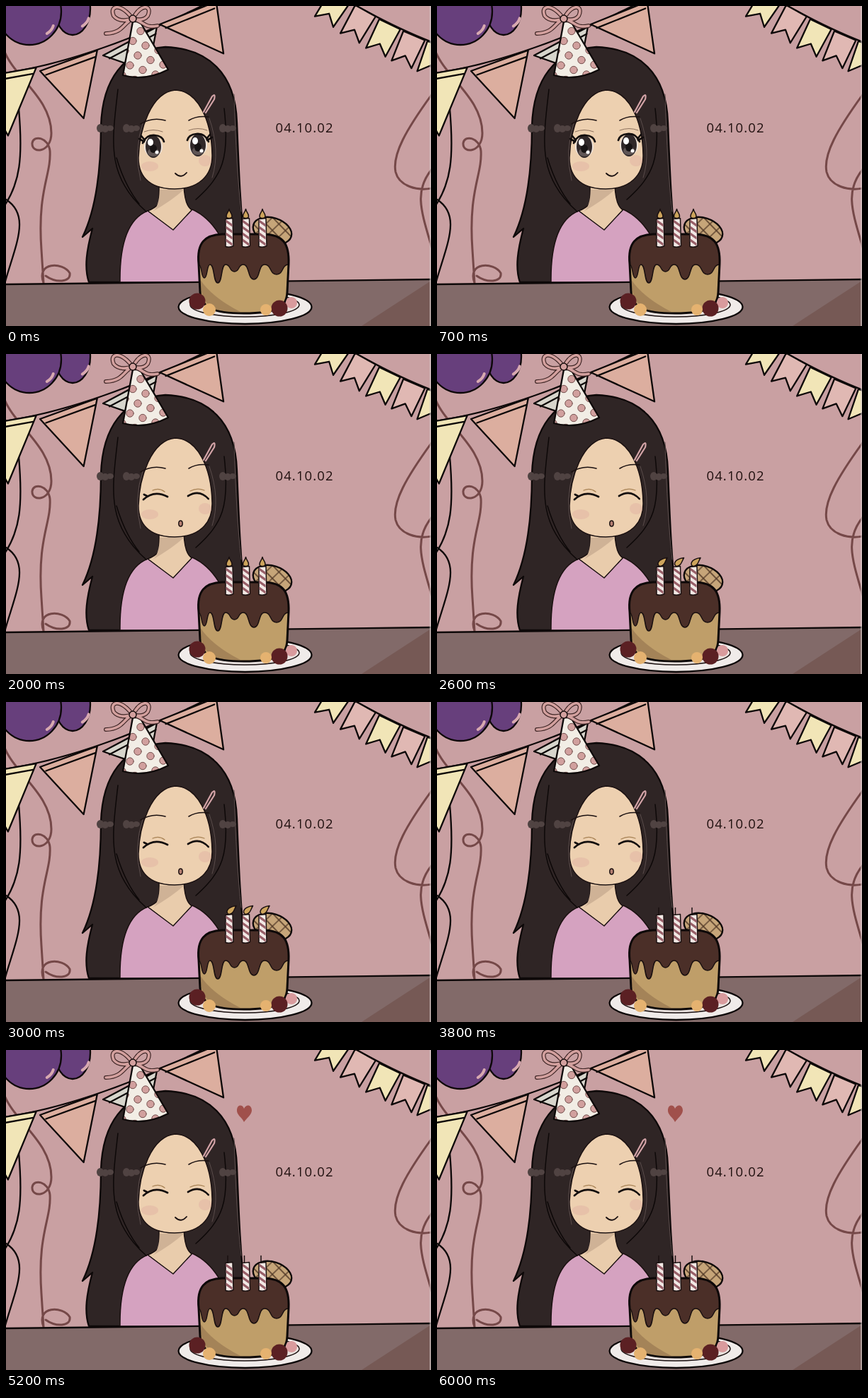
An HTML page for the animation above (6.1 s loop, 600 px wide and 453 px high).

```html
<!DOCTYPE html>
<html lang="en">
<head>
<meta charset="utf-8">
<title>Birthday cake</title>
<style>
  html, body { margin: 0; width: 100%; height: 100%; overflow: hidden; background: #c9a0a2; }
  svg { display: block; width: 100vw; height: 100vh; stroke-linecap: round; stroke-linejoin: round; }
  .ink { stroke: #0d0808; stroke-width: 2.3; }
  .thin { stroke: #1a1010; stroke-width: 1.5; }
  .open { fill: none; }
  .ribbon { fill: none; stroke: #754848; stroke-width: 3; }
  .blush { fill: #dca79d; opacity: .35; }
  text { font: 400 18.5px "Open Sans", Lato, sans-serif; letter-spacing: 1.1px; fill: #20100f; }
</style>
</head>
<body>
<svg viewBox="0 0 600 453" preserveAspectRatio="none">
  <defs>
    <pattern id="waffle" width="13" height="13" patternUnits="userSpaceOnUse" patternTransform="rotate(28)">
      <path d="M0 0H13V13H0Z" fill="#c6a579" stroke="#4e3524" stroke-width="1.3"/>
    </pattern>
    <clipPath id="hatArea"><use href="#hat"/></clipPath>
    <path id="hat" d="M179 22 L165 98 Q196 107 229 90 L189 22Z"/>
    <path id="bow" d="M179 18 C160 -6 146 0 152 14 Q160 24 179 18 C192 -6 207 0 200 14 Q194 22 179 18 C165 24 166 38 141 39 M179 18 C196 22 194 32 214 28"/>
    <path id="lash" d="M-15 -5 Q-10 -17 2 -16 Q13 -15 15 -7 M-13 -7 L-20 -11 M-12 -9 L-17 -15"/>
    <path id="closedLid" d="M-15 6 Q0 -8 19 2"/>
    <g id="candle">
      <path class="thin" d="M-5 1 L5 0 L6 39 Q1 42 -5 40Z" fill="#f2e9e5"/>
      <line y1="5" y2="37" stroke="#985f68" stroke-width="9" stroke-dasharray="4 5" stroke-linecap="butt" transform="skewY(35)"/>
    </g>
    <path id="upright" class="thin" fill="#cda45c" d="M0 -13 C1 -8 4 -7 4 -3 C4 1 -4 1 -4 -3 C-4 -7 -1 -8 0 -13Z"/>
    <path id="bent" class="thin" fill="#cda45c" d="M10 -12 C7 -7 6 0 0 0 C-5 -1 -5 -10 10 -12Z"/>
    <path id="wick" class="thin" d="M-2 -9 V0"/>
    <path id="cake" d="M272 365 C269 335 281 324 305 323 H365 C391 324 400 336 399 365 L397 405 C396 428 382 435 336 435 C291 435 276 427 274 405Z"/>
  </defs>

  <rect width="600" height="453" fill="#c9a0a2"/>

  <!-- Streamers -->
  <g class="ribbon">
    <path d="M-3 62 C10 100 64 130 64 180 C64 208 36 210 37 194 C39 182 60 186 62 205 C64 240 44 260 50 345 L53 392 C42 362 80 362 90 378 C92 392 70 392 56 382"/>
    <path d="M602 124 C565 175 545 210 550 235 C555 255 580 262 602 258 M602 230 C575 262 586 290 602 345"/>
  </g>
  <path class="ink open" d="M18 145 C24 215 20 250 -3 284 M-3 272 C38 295 12 340 -3 397"/>

  <!-- Balloons -->
  <g id="balloons"></g>

  <!-- Bunting -->
  <path class="ink open" d="M-2 95 Q130 75 300 -12 M450 -26 Q540 28 604 52"/>
  <g id="bunting" class="ink"></g>

  <text x="380.5" y="179">04.10.02</text>

  <!-- Hair and body -->
  <path class="ink" fill="#2f2525" d="M225 58 C165 62 136 105 134 170 C134 240 126 290 108 327 L122 315 C114 345 110 370 117 391 H325 L338 350 C331 290 329 240 326 165 C324 95 285 60 225 58Z"/>
  <path class="thin" fill="#e9ccac" d="M216 252 V279 Q211 286 200 290 L236 318 L263 289 Q252 284 251 252Z"/>
  <path d="M217 260 H251 Q236 274 207 291 Q216 285 217 260Z" fill="#cfb296"/>
  <path class="thin" fill="#d5a2c0" d="M200 290 L236 317 L263 288 Q285 298 300 322 L318 391 H161 Q160 306 200 290Z"/>
  <path class="thin" fill="#edd0b0" d="M239 119 C205 122 188 175 187 215 C187 246 208 259 238 259 C272 259 292 240 291 210 C290 160 270 120 239 119Z"/>
  <ellipse class="blush" cx="203" cy="227" rx="12" ry="7"/>
  <ellipse class="blush" cx="281" cy="219" rx="9" ry="8"/>

  <!-- Hair strands and shine -->
  <path class="open" d="M158 118 C150 190 140 240 198 291 M308 145 C316 215 306 240 268 274 M156 215 Q168 255 188 280" stroke="#0d0808" stroke-width="1.5"/>
  <path class="open" d="M193 166 Q180 205 190 247 M287 159 Q303 205 291 243 M322 125 Q325 230 332 291" stroke="#5a4c4b"/>
  <g id="shine" fill="#504342"></g>
  <path class="open" d="M279 150 L291 128 Q296 123 294 132 L282 151" stroke="#d4a4a8" stroke-width="2.2"/>

  <!-- Expressions -->
  <path class="thin open" d="M190 167 Q206 157 225 162 M258 162 Q269 155 286 157"/>
  <g id="eyesOpen"></g>
  <g id="eyesClosed" class="open">
    <g stroke="#110c0c" stroke-width="2.8">
      <use href="#closedLid" x="209" y="200"/>
      <use href="#closedLid" transform="translate(273 199) scale(-.85 1)"/>
      <path d="M199 201 L195 199"/>
    </g>
    <path d="M207 193 Q216 189 224 195 M260 194 Q270 189 280 193" stroke="#a88254" stroke-width="1.3"/>
  </g>
  <path id="smile" class="open" d="M239 237 Q247 245 255 236" stroke="#1a1010" stroke-width="1.8"/>
  <ellipse id="blowing" class="thin" cx="246.5" cy="240" rx="2.7" ry="4" fill="#b57f72"/>

  <!-- Party hat -->
  <use href="#hat" fill="#f2ede5"/>
  <g id="dots" clip-path="url(#hatArea)" fill="#d1a09e" stroke="#775351"></g>
  <use href="#hat" class="ink open"/>
  <use href="#bow" class="open" stroke="#3f2626" stroke-width="6"/>
  <use href="#bow" class="open" stroke="#d3a09e" stroke-width="3.6"/>
  <circle class="thin" cx="179" cy="18" r="5" fill="#d3a09e"/>

  <!-- Table -->
  <path d="M-2 394 L602 387 V455 H-2Z" fill="#826a69"/>
  <path d="M600 389 L502 453 H600Z" fill="#765955"/>
  <path class="ink open" d="M-2 394 L602 387"/>

  <!-- Cake -->
  <ellipse class="ink" cx="337.5" cy="426" rx="94" ry="24" fill="#f0ebe9"/>
  <ellipse class="thin" cx="337" cy="423" rx="77" ry="17" fill="#e9e1de"/>
  <ellipse class="ink" cx="376" cy="318" rx="28" ry="18" fill="url(#waffle)" transform="rotate(18 376 318)"/>
  <use href="#cake" fill="#bf9e69"/>
  <path d="M274 387 Q290 412 331 433 Q274 440 274 387Z" fill="#a48358"/>
  <path id="icing" class="thin" fill="#4b2f28"/>
  <use href="#cake" class="open" stroke="#0d0808" stroke-width="3"/>
  <circle cx="403" cy="420" r="8" fill="#d99b9d"/>
  <g fill="#5b2023"><circle cx="270" cy="418" r="11.5"/><circle cx="386" cy="428" r="11.5"/></g>
  <g fill="#e5b270"><circle cx="287" cy="430" r="9"/><circle cx="367" cy="430" r="8"/></g>
  <g id="candles"></g>

  <path id="heart" fill="#a0504b" d="M336 102 C333 95 325 92 326 84 C327 77 334 77 336 83 C339 76 347 77 347 86 C346 93 339 97 336 102Z"/>
  <path d="M599 0V453" stroke="#d6cbca" stroke-width="2" opacity=".6"/>
</svg>

<script>
const $ = id => document.getElementById(id);
const repeat = (count, make) => Array.from({ length: count }, (_, i) => make(i)).join("");
const YELLOW = "#f1e5b7", PINK = "#dcae9f", ROSE = "#e0b8b3", WHITE = "#d7d5cc";

function balloon(x, y, rx, ry) {
  return `<ellipse class="ink" cx="${x}" cy="${y}" rx="${rx}" ry="${ry}" fill="#673f7c"/>
    <path d="M${x + rx * .55} ${y + ry * .66} q7 -4 9 -11" fill="none" stroke="#d8a9b0" stroke-width="4"/>`;
}
$("balloons").innerHTML = balloon(94, 4, 25, 37) + balloon(33, 8, 45, 47);

function pennant(x, y, angle, tip, fill) {
  return `<g transform="translate(${x} ${y}) rotate(${angle})">
    <path d="M0 0 H86 L${tip}Z" fill="${fill}"/><path d="M6 8 H80"/></g>`;
}

// Swallow-tailed flags hang along a sagging string that flattens to the right.
function swallowtail(i) {
  const x = 459 + 34 * i, y = -24 + 24.2 * i - 1.45 * i * i;
  return `<path transform="translate(${x} ${y}) rotate(${32 - 3 * i})"
    d="M0 0 H33 L31 44 L16 31 L1 45Z" fill="${i % 2 ? ROSE : YELLOW}"/>`;
}
$("bunting").innerHTML =
  pennant(-42, 102, -10, "30 88", YELLOW) + pennant(48, 92, -20, "35 84", PINK) +
  pennant(137, 70, -28, "46 50", WHITE) + pennant(217, 26, -22, "68 72", PINK) +
  repeat(5, swallowtail);

$("shine").innerHTML = [140, 177, 313].map(x =>
  repeat(3, i => `<ellipse cx="${x - 7 + 7 * i}" cy="${173 + i % 2}" rx="5" ry="${6 - i}"/>`)).join("");

function openEye(x, y, side) {
  return `<g transform="translate(${x} ${y})">
    <ellipse rx="13" ry="15" fill="#eee3da"/>
    <ellipse rx="11" ry="16" fill="#302829"/>
    <ellipse cy="8" rx="8" ry="6" fill="#605656"/>
    <ellipse cy="3" rx="5" ry="6" fill="#171314"/>
    <ellipse cx="-4" cy="-6" rx="4" ry="5" fill="#fff"/>
    <circle cx="5" cy="8" r="2.5" fill="#fff"/>
    <g transform="scale(${side} 1)" fill="none">
      <use href="#lash" stroke="#110c0c" stroke-width="2.7"/>
      <path d="M-13 -21 Q0 -26 13 -21" stroke="#8c705c"/>
    </g></g>`;
}
$("eyesOpen").innerHTML = openEye(208, 199, 1) + openEye(271, 197, -1);

// Slanted lattice of dots, clipped to the hat.
$("dots").innerHTML = repeat(5, row => repeat(7, col =>
  `<circle cx="${186 + 18 * (col - 3) + 11 * (row - 2)}" cy="${70 + 6.5 * (col - 3) - 14 * (row - 2)}" r="5.2"/>`));

const drips = [[16, 19], [22, 26], [25, 10], [30, 21], [34, 14]];
$("icing").setAttribute("d", "M272 366" + drips.map(([width, depth]) => {
  const half = width / 2, pull = width * .3;
  return `c${pull} 0 ${half - pull} ${depth} ${half} ${depth} s${half - pull} ${-depth} ${half} ${-depth}`;
}).join("") + "C400 336 391 324 365 323 H305 C281 324 269 335 272 366Z");

const onCandles = id => repeat(3, i => `<use href="#${id}" x="${315 + 23.5 * i}" y="300.5"/>`);
$("candles").innerHTML = onCandles("candle") +
  ["upright", "bent", "wick"].map(id => `<g id="${id}Set">${onCandles(id)}</g>`).join("");

const LOOP = 6100;
const CLOSE_EYES = 1000, PURSE_LIPS = 1700, BLOW = 2400, FLAMES_OUT = 3500,
      SMILE_AGAIN = 4000, HEART = 4400;

function show(id, visible) {
  $(id).style.display = visible ? "" : "none";
}

function draw(now) {
  const t = now % LOOP;
  const blowing = t >= PURSE_LIPS && t < SMILE_AGAIN;
  show("eyesOpen", t < CLOSE_EYES);
  show("eyesClosed", t >= CLOSE_EYES);
  show("smile", !blowing);
  show("blowing", blowing);
  show("uprightSet", t < BLOW);
  show("bentSet", t >= BLOW && t < FLAMES_OUT);
  show("wickSet", t >= FLAMES_OUT);
  show("heart", t >= HEART);
  requestAnimationFrame(draw);
}
draw(performance.now());
</script>
</body>
</html>
```
